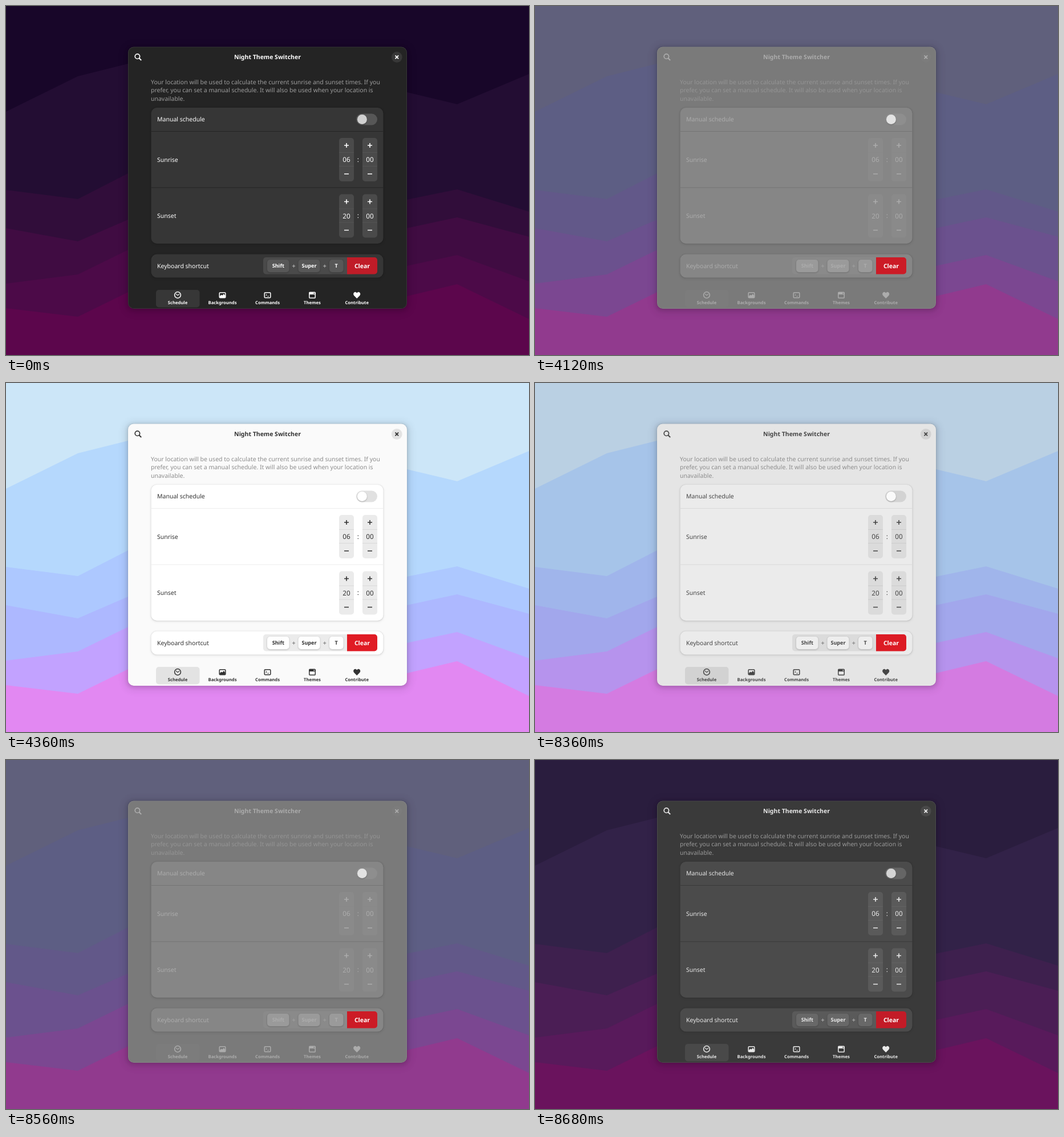
Animation of 917x611 px, one loop 8.72 s. Source, as an HTML page:

```html
<!DOCTYPE html>
<html lang="en">
<head>
<meta charset="utf-8">
<title>Night Theme Switcher</title>
<style>
html, body { margin: 0; width: 100%; height: 100%; overflow: hidden; }
svg { position: absolute; inset: 0; width: 100%; height: 100%; }
.dark {
  --sky: #180629; --h1: #230d33; --h2: #310d3a; --h3: #400c42; --h4: #4c0a48; --h5: #5c064c; --h6: #640245;
  --window: #242424; --edge: #3b3b3b; --card: #363636; --line: #242424; --fg: #fff;
  --field: #4a4a4a; --divider: #545454; --trough: #575757; --knob: #d0d0d0; --key: #575757;
  --active: #373737; --clear: #c01c28;
}
.light {
  --sky: #cce6f8; --h1: #b5d8fd; --h2: #adc8ff; --h3: #adb8ff; --h4: #c2a2ff; --h5: #e288f2; --h6: #ff78d8;
  --window: #fafafa; --edge: #fafafa; --card: #fff; --line: #ededed; --fg: #323232;
  --field: #ebebeb; --divider: #d9d9d9; --trough: #e1e1e1; --knob: #fff; --key: #fff;
  --active: #e3e3e3; --clear: #e01b24;
}
text { font: 10.5px "Noto Sans", sans-serif; fill: var(--fg); text-rendering: geometricPrecision; }
.bold { font-weight: 700; }
.mid { text-anchor: middle; }
.dim { opacity: .55; }
.num { font-size: 11.7px; }
.small { font-size: 9.1px; }
.tab { font-size: 7.65px; }
.icon { fill: none; stroke: var(--fg); stroke-width: 1.5; }
.solid { fill: var(--fg); stroke: none; }
</style>
</head>
<body>
<script>
const FADE = 4000, STEP = 40, STEPS = 10, BACK = 8360, LOOP = 8720;

const text = (x, y, label, cls = '') => `<text x="${x}" y="${y}" class="${cls}">${label}</text>`;
const path = (d, cls = 'icon', extra = '') => `<path d="${d}" class="${cls}" ${extra}/>`;
const rect = (x, y, w, h, r, fill, extra = '') =>
  `<rect x="${x}" y="${y}" width="${w}" height="${h}" rx="${r}" fill="${fill}" ${extra}/>`;
const box = (x, y, w, h, r, name) => rect(x, y, w, h, r, `var(--${name})`);

// Soft shadow behind a rounded box
const shadow = (x, y, w, h, r, drop, spread, blur, alpha) =>
  rect(x - spread, y - spread + drop, w + 2 * spread, h + 2 * spread, r + spread, '#000',
    `opacity="${alpha}" style="filter:blur(${blur}px)"`);

const hill = (points, name) => `<path d="M0 611L${points}L917 611Z" fill="var(--${name})"/>`;

const wallpaper = () => box(0, 0, 917, 611, 0, 'sky') +
  hill('0 185 126 123 214 101 458 92 703 151 791 172 917 119', 'h1') +
  hill('0 322 126 338 214 293 458 290 703 339 791 321 917 360', 'h2') +
  hill('0 389 126 412 214 374 458 350 703 389 791 370 917 404', 'h3') +
  hill('0 486 126 470 214 427 458 410 703 455 791 436 917 482', 'h4') +
  hill('0 529 126 544 214 501 458 480 703 508 791 487 917 548', 'h5') +
  path('M245 611L300 610H500L532 611Z', '', 'fill="var(--h6)"');

const card = (y, h) =>
  shadow(254.5, y, 407, h, 10, 0, .8, 0, .03) +
  shadow(254.5, y, 407, h, 10, .8, .8, 1.2, .07) +
  shadow(254.5, y, 407, h, 10, 1.6, 1.6, 2.4, .03) +
  box(254.5, y, 407, h, 10, 'card');

const spinner = (x, y, value) => box(x, y, 26, 76, 5, 'field') +
  box(x, y + 25, 26, 1, 0, 'divider') + box(x, y + 49, 26, 1, 0, 'divider') +
  path(`M${x + 9} ${y + 13}h8m-4 -4v8M${x + 9} ${y + 63}h8`, 'icon', 'style="stroke-width:1.6"') +
  text(x + 13, y + 42, value, 'num mid');

const timeRow = (y, label, hours) => text(265, y + 41.5, label) +
  spinner(584, y, hours) + text(617.3, y + 41.5, ':', 'num mid') + spinner(625, y, '00');

const key = (x, w, label) =>
  shadow(x, 444, w, 22, 5, .8, .6, .8, .14) +
  box(x, 444, w, 22, 5, 'key') + text(x + w / 2, 458.3, label, 'small bold mid');

const tab = (x, label, icon) =>
  `<g transform="translate(${x} 506)">${icon}</g>` + text(x, 522.2, label, 'tab bold mid');

const tabs = () => box(263, 497, 76.5, 30.5, 5, 'active') +
  tab(301, 'Schedule', '<circle r="5.4" class="icon"/>' + path('M-2.8 -2L0 .6L3 -1.8', 'icon', 'style="stroke-width:1.1"')) +
  tab(379.5, 'Backgrounds', '<rect x="-5.3" y="-4.3" width="10.6" height="9" rx="1.2" class="icon"/>' +
    path('M-4.4 4V1.8L-1.8 -.6L-.2 .8L2.4 -2L4.4 .4V4Z', 'solid')) +
  tab(458.5, 'Commands', '<rect x="-5.3" y="-4.3" width="10.6" height="9" rx="1.2" class="icon"/>' +
    path('M-3.2 -2L-1.2 -.2L-3.2 1.6M-.2 2.2H2.4', 'icon', 'style="stroke-width:1"')) +
  tab(537, 'Themes', '<rect x="-5.2" y="-4.8" width="10.4" height="10" rx="1" class="icon"/>' +
    path('M-5.2 -5H5.2V-1H-5.2Z', 'solid') + '<circle cx="3.3" cy="-3" r=".9" fill="var(--window)"/>') +
  tab(615.2, 'Contribute', path('M0 6L-5 1C-8.4 -3 -3 -8 0 -3.6C3 -8 8.4 -3 5 1Z', 'solid'));

const header = () =>
  '<circle cx="230.4" cy="88.3" r="4.2" class="icon" style="stroke-width:1.7"/>' +
  path('M233.4 91.3L237.2 95.1', 'icon', 'style="stroke-width:2"') +
  text(458.5, 93, 'Night Theme Switcher', 'bold mid') +
  '<circle cx="685.3" cy="89.5" r="9.4" fill="var(--active)"/>' +
  path('M682.5 86.7l5.6 5.6m0 -5.6l-5.6 5.6', 'icon', 'style="stroke-width:1.8"');

const description = () => [
  'Your location will be used to calculate the current sunrise and sunset times. If you',
  'prefer, you can set a manual schedule. It will also be used when your location is',
  'unavailable.'
].map((line, i) => text(254, 136.7 + 14.5 * i, line, 'dim')).join('');

const schedule = () => card(178, 238) +
  box(254.5, 219, 407, 1, 0, 'line') + box(254.5, 317.5, 407, 1, 0, 'line') +
  text(265, 202.2, 'Manual schedule') +
  box(614, 188.5, 37, 20, 10, 'trough') +
  shadow(616, 190, 17, 17, 8.5, 1, 0, 1, .25) +
  '<circle cx="624.4" cy="198.5" r="8.5" fill="var(--knob)"/>' +
  timeRow(231, 'Sunrise', '06') + timeRow(329.5, 'Sunset', '20');

const shortcut = () => card(434.5, 41) + text(265, 458.9, 'Keyboard shortcut') +
  box(451, 440, 160, 29.5, 5, 'field') +
  path('M598 440H646a5 5 0 0 1 5 5V464.5a5 5 0 0 1 -5 5H598Z', '', 'fill="var(--clear)"') +
  text(624.5, 458.9, 'Clear', 'bold mid" style="fill:#fff') +
  key(458, 38.5, 'Shift') + key(512.5, 38, 'Super') + key(567, 24.5, 'T') +
  text(504.6, 458.6, '+', 'bold mid dim') + text(558.8, 458.6, '+', 'bold mid dim');

const appWindow = () =>
  shadow(214, 71.5, 489, 458, 10, 0, .8, 0, .05) +
  shadow(214, 71.5, 489, 458, 10, 1.6, 1.6, 3.3, .13) +
  shadow(214, 71.5, 489, 458, 10, 2.4, 7, 6.5, .07) +
  box(214, 71.5, 489, 458.5, 10, 'edge') + box(214.8, 72.3, 487.4, 456.9, 9.2, 'window') +
  header() + description() + schedule() + shortcut() + tabs();

const scene = theme =>
  `<svg class="${theme}" viewBox="0 0 917 611" preserveAspectRatio="none">${wallpaper()}${appWindow()}</svg>`;

document.body.innerHTML = scene('dark') + scene('light');
const lightScene = document.querySelector('.light');

// Share of the light theme, changing in hard steps
function lightness(t) {
  if (t < FADE) return 0;
  if (t < BACK) return Math.min(1, (Math.floor((t - FADE) / STEP) + 1) / STEPS);
  return 1 - (Math.floor((t - BACK) / STEP) + 1) / STEPS;
}

const start = performance.now();
function draw() {
  lightScene.style.opacity = lightness((performance.now() - start) % LOOP);
  requestAnimationFrame(draw);
}
draw();
</script>
</body>
</html>
```
